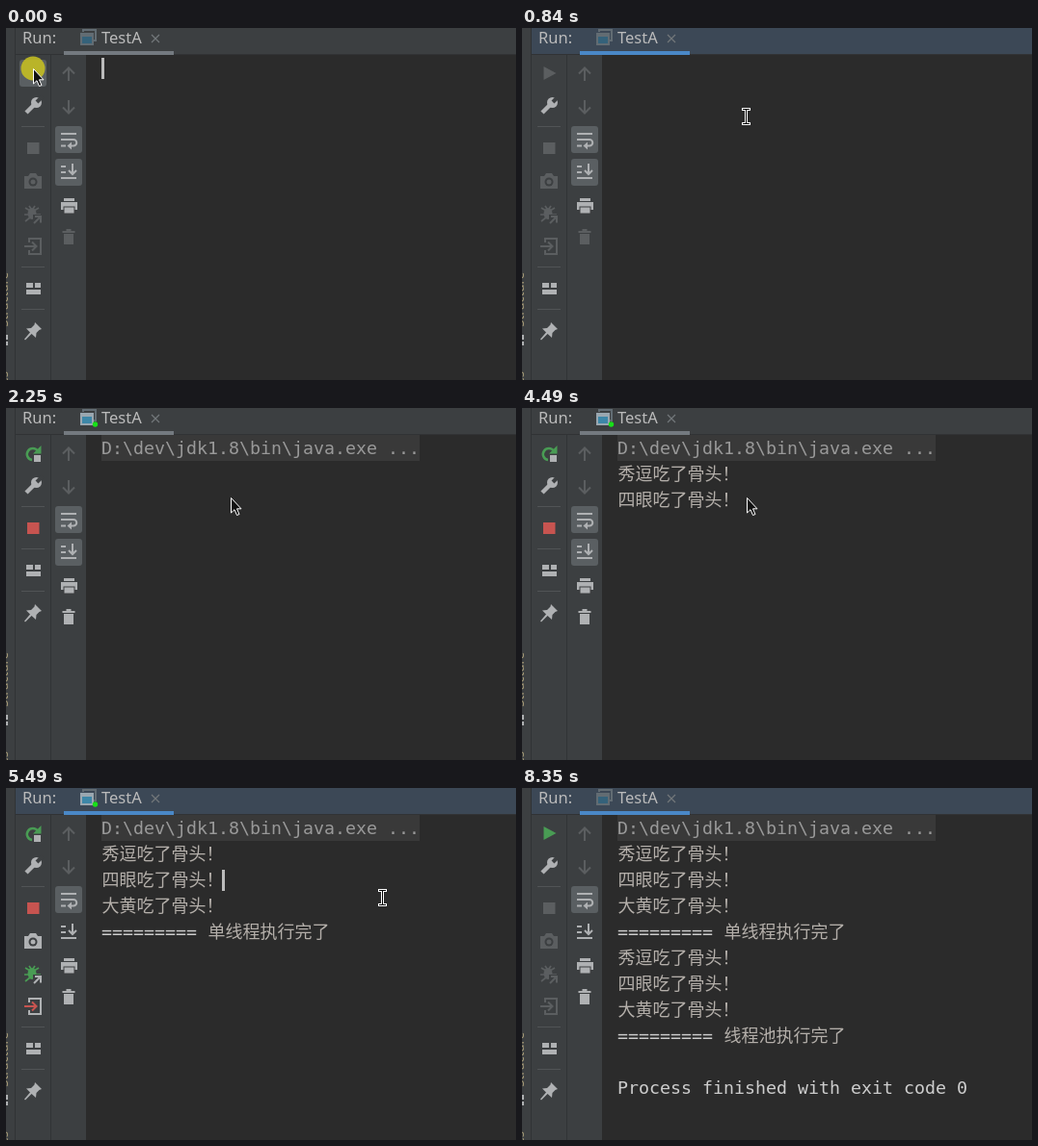
Recreate the animation shown at these times as an HTML page. Size 529 by 366 pixels, loop 8.43 s.

```html
<!DOCTYPE html>
<html lang="zh-CN">
<head>
<meta charset="utf-8">
<title>Run console</title>
<style>
html, body { margin: 0; width: 100%; height: 100%; overflow: hidden; background: #2b2b2b; }
svg { display: block; width: 529px; height: 366px; }
.ui { font: 16.5px "Noto Sans", "Open Sans", sans-serif; fill: #bbb; }
.side { font: 13px "Noto Sans", "Open Sans", sans-serif; fill: #a89c78; }
.con { font: 18.27px "DejaVu Sans Mono", monospace; fill: #cdcdcd; white-space: pre; }
.zh { font: 300 18px "Noto Sans CJK SC Light", "Noto Sans CJK SC", "Noto Sans CJK", sans-serif; fill: #b4afaa; }
.on { fill: #afb1b3; color: #afb1b3; }
.dim { fill: #5b5e60; color: #5b5e60; }
.ln { fill: none; stroke: currentColor; stroke-width: 2; }
.sep { fill: #515456; shape-rendering: crispEdges; }
.btn { fill: #5a5f62; }
</style>
</head>
<body>
<svg viewBox="0 0 529 366">
  <rect width="529" height="366" fill="#2b2b2b"/>
  <rect width="83" height="366" fill="#3c3f41"/>
  <rect id="head" x="10" width="519" height="27" fill="#3c3f41"/>
  <g fill="#313335" shape-rendering="crispEdges">
    <rect x="9" width="1" height="366"/>
    <rect x="46" y="28" width="1" height="338"/>
    <rect x="10" y="27" width="519" height="1"/>
  </g>

  <text class="side" text-anchor="end" transform="translate(2 254) rotate(-90)">Structure</text>
  <text class="side" text-anchor="end" transform="translate(2 357) rotate(-90)">Favorites</text>
  <path class="on" d="M0 319h2v5h-2zM0 326h2v4h-2z"/>

  <!-- tab -->
  <text class="ui" x="17" y="16">Run:</text>
  <text class="ui" x="99" y="16">TestA</text>
  <rect id="line" x="60" y="24" width="114" height="4" fill="#747a80"/>
  <path d="M80 4V2H93V13H91" fill="none" stroke="#626c73" stroke-width="2"/>
  <rect id="win" x="77" y="5" width="14" height="13" fill="#626c73"/>
  <rect id="pane" x="79" y="9" width="10" height="7" fill="#35627a"/>
  <circle id="dot" cx="92.5" cy="17" r="2.7" fill="#18e018"/>
  <path d="M151 7l8 8m0-8l-8 8" stroke="#72777a" stroke-width="1.2"/>

  <!-- left toolbar -->
  <rect id="hover" class="btn" x="14" y="33" width="28" height="28" rx="3"/>
  <path id="play" d="M22.500 40L35.500 47L22.500 54Z" fill="#5b5e60"/>
  <g id="rerun">
    <path d="M27 54A6 6 0 1 1 33 45" fill="none" stroke="#499c54" stroke-width="2.6"/>
    <path d="M36.500 39V47.500H28Z" fill="#499c54"/>
    <rect class="on" x="29" y="49" width="7" height="7"/>
  </g>
  <g class="on">
    <path class="ln" d="M21 88L30 79" style="stroke-width:4.500"/>
    <circle cx="31.500" cy="77.500" r="5.500"/>
    <path d="M32 77L38 71" stroke="#3c3f41" stroke-width="4"/>
  </g>
  <rect class="sep" x="16" y="102" width="24" height="1"/>
  <rect id="stop" x="22" y="119" width="12.500" height="12" fill="#5b5e60"/>
  <g id="extra">
    <g class="tint dim">
      <path d="M19 154h4l2-3h6l2 3h4v13h-18z" fill="currentColor"/>
      <circle cx="28" cy="160" r="4.500" fill="#3c3f41"/>
      <circle cx="28" cy="160" r="2.500" fill="currentColor"/>
    </g>
    <g id="bug" class="dim">
      <ellipse cx="27" cy="193" rx="4.500" ry="6" fill="currentColor"/>
      <path class="ln" d="M20 187l5 3m9-3l-5 3M19 194h17M20 201l5-4M24 185l2 3m4-3l-2 3" style="stroke-width:1.700"/>
    </g>
    <path d="M28 204V194H39V204Z" fill="#3c3f41"/>
    <path class="tint dim ln" d="M29 203L36 196M30 196H36V202.500"/>
    <path class="tint dim ln" d="M24 223V219H36V235H24V231"/>
    <path id="exit" class="dim ln" d="M19 227H31M27 222.500L31.500 227L27 231.500"/>
  </g>
  <g id="lower">
    <rect class="sep" x="16" y="248" width="24" height="1"/>
    <path class="on" d="M21 265h7v5h-7zM30 265h6v5h-6zM21 272h15v5h-15z"/>
    <rect class="sep" x="16" y="292" width="24" height="1"/>
    <path class="on" d="M30 306L37 313L34.500 314L31.500 317L31 322L26.500 318L20 324.500L19 323.500L25 316.500L21 312.500L26 312L29.500 308.500Z"/>
  </g>

  <!-- console toolbar -->
  <path class="dim ln" d="M65 55V42M59 47.500L65 41.500L71 47.500"/>
  <path class="dim ln" d="M65 75V88M59 82.500L65 88.500L71 82.500"/>
  <rect class="btn" x="51" y="102" width="28" height="28" rx="3"/>
  <g class="on">
    <path class="ln" d="M57 110H73M57 116H70A3.200 3.200 0 0 1 70 122.500H67M57 122.500H62"/>
    <path d="M68 118.500V126.500L63.500 122.500Z"/>
  </g>
  <rect id="tail" class="btn" x="51" y="136" width="28" height="28" rx="3"/>
  <path class="on ln" d="M57 156H73M57 144H62M57 150H62M69 141V152M65 148L69 152L73 148"/>
  <g class="on">
    <path d="M60 177h11v3h-11zM57 181h17v8h-17z"/>
    <rect x="60" y="186" width="11" height="7" stroke="#3c3f41"/>
  </g>
  <path id="bin" d="M62.500 209h5v2h4v2h-13v-2h4zM60 214h10v11h-10z" fill="#5b5e60"/>

  <!-- console -->
  <g id="out"></g>
  <rect id="caret" width="3" height="22" fill="#bbb"/>

  <!-- pointers -->
  <circle id="click" r="12.500" fill="#c6c021" fill-opacity=".88"/>
  <path id="arrow" d="M.5 .5V16L4 12.700L6.500 18.500L9 17.500L6.500 11.800H11Z" fill="#111" stroke="#fff"/>
  <g id="beam" fill="none" shape-rendering="crispEdges" stroke-linecap="square">
    <path d="M-2.500 -7.500H3.500M.5 -7.500V7.500M-2.500 7.500H3.500" stroke="#fff" stroke-width="3"/>
    <path d="M-2.500 -7.500H3.500M.5 -7.500V7.500M-2.500 7.500H3.500" stroke="#000"/>
  </g>
  <g id="ring" fill="none">
    <circle r="9.500" stroke="#1f7fc4" stroke-width="4.500"/>
    <path d="M0 -9.500A9.500 9.500 0 0 1 9.500 0" stroke="#8fdcf5" stroke-width="3"/>
  </g>
</svg>
<script>
const LOOP = 8430;
const DIM = '#5b5e60', LIT = '#afb1b3', GREEN = '#499c54', RED = '#c75450';
const $ = id => document.getElementById(id);

// Holds each value until the next time in the table.
function step(el, prop, table) {
  const frames = table.map(([t, v]) => ({ offset: t / LOOP, [prop]: v, easing: 'steps(1, end)' }));
  frames.push({ offset: 1, [prop]: table[table.length - 1][1] });
  el.animate(frames, { duration: LOOP, iterations: Infinity });
}

// Starts at the first value and flips at each time.
function toggle(el, first, ...times) {
  step(el, 'opacity', [[0, first], ...times.map((t, i) => [t, (first + i + 1) % 2])]);
}

const START = 2170, ATTACH = 4950, END = 6650;

// Window focus and tab
const focus = (id, off, on) => step($(id), 'fill', [[0, off], [150, on], [2090, off], [4570, on]]);
focus('head', '#3c3f41', '#3c4856');
focus('line', '#747a80', '#4a88c7');
const running = (id, off, on) => step($(id), 'fill', [[0, off], [START, on], [END, off]]);
running('win', '#626c73', '#9aa7b0');
running('pane', '#35627a', '#3d87a8');
running('stop', DIM, RED);
toggle($('dot'), 0, START, END);

// Toolbars
toggle($('hover'), 1, 380);
toggle($('play'), 1, START, END);
step($('play'), 'fill', [[0, DIM], [END, GREEN]]);
toggle($('rerun'), 0, START, END);
toggle($('extra'), 1, START, ATTACH);
step($('lower'), 'transform', [[0, 'translateY(0px)'], [START, 'translateY(-102px)'], [ATTACH, 'translateY(0px)']]);
const tint = (el, c) => step(el, 'color', [[0, DIM], [ATTACH, c], [END, DIM]]);
document.querySelectorAll('.tint').forEach(el => tint(el, LIT));
tint($('bug'), GREEN);
tint($('exit'), RED);
toggle($('tail'), 1, ATTACH);
step($('bin'), 'fill', [[0, DIM], [START, LIT]]);

// Console lines: row, time, text
const SVG = 'http://www.w3.org/2000/svg';
function make(name, attrs, parent) {
  const el = document.createElementNS(SVG, name);
  for (const k in attrs) el.setAttribute(k, attrs[k]);
  return parent.appendChild(el);
}
function print(row, time, text, zh = '') {
  const g = make('g', {}, $('out')), top = 28 + 27 * row;
  if (!row) make('rect', { x: 99, y: top, width: 330, height: 27, fill: '#393939' }, g);
  const line = make('text', { class: 'con', x: 99, y: top + 20 }, g);
  if (!row) line.style.fill = '#999';
  line.textContent = text;
  if (zh) make('tspan', { class: 'zh', dx: .5 }, line).textContent = zh;
  toggle(g, 0, time);
}
const dogs = ['秀逗', '四眼', '大黄'];
print(0, 2250, 'D:\\dev\\jdk1.8\\bin\\java.exe ...');
dogs.forEach((d, i) => {
  print(1 + i, [3480, 4490, 5490][i], '', d + '吃了骨头！');
  print(5 + i, 6500, '', d + '吃了骨头！');
});
print(4, 5490, '========= ', '单线程执行完了');
print(8, 6500, '========= ', '线程池执行完了');
print(10, 6900, 'Process finished with exit code 0');

// Caret
step($('caret'), 'transform', [[0, 'translate(99px, 31px)'], [2090, 'translate(224px, 85px)']]);
toggle($('caret'), 1, 770, 1240, 2090, 4570, 5030, 5490, 6040, 6500, 7510, 8050, 8350);

// Pointer path: hold points plus eased, sampled moves
const path = [[0, 28, 42]];
function move(from, to, n, x, y, ease) {
  const [, x0, y0] = path[path.length - 1];
  for (let i = 1; i <= n; i++) {
    const k = ease(i / n);
    path.push([from + (to - from) * (i - 1) / (n - 1), Math.round(x0 + (x - x0) * k), Math.round(y0 + (y - y0) * k)]);
  }
}
const smooth = k => k * k * (3 - 2 * k);
move(380, 840, 7, 232, 92, smooth);
path.push([1010, 233, 93]);
move(4950, 5030, 2, 248, 99, k => k);
move(5260, 5490, 4, 390, 114, smooth);
move(7890, 8050, 3, 488, 342, k => k ** 1.5);

const place = path.map(([t, x, y]) => [t, `translate(${x}px, ${y}px)`]);
['arrow', 'beam', 'ring', 'click'].forEach(id => step($(id), 'transform', place));
const enter = path.find(p => p[1] > 84)[0];
toggle($('arrow'), 1, enter, 2090, 4950);
toggle($('beam'), 0, enter, 1540, 1620, 2090, 4950, 8120);
toggle($('ring'), 0, 1540, 1620);
toggle($('click'), 1, 70, 4570, 4650);
</script>
</body>
</html>
```
